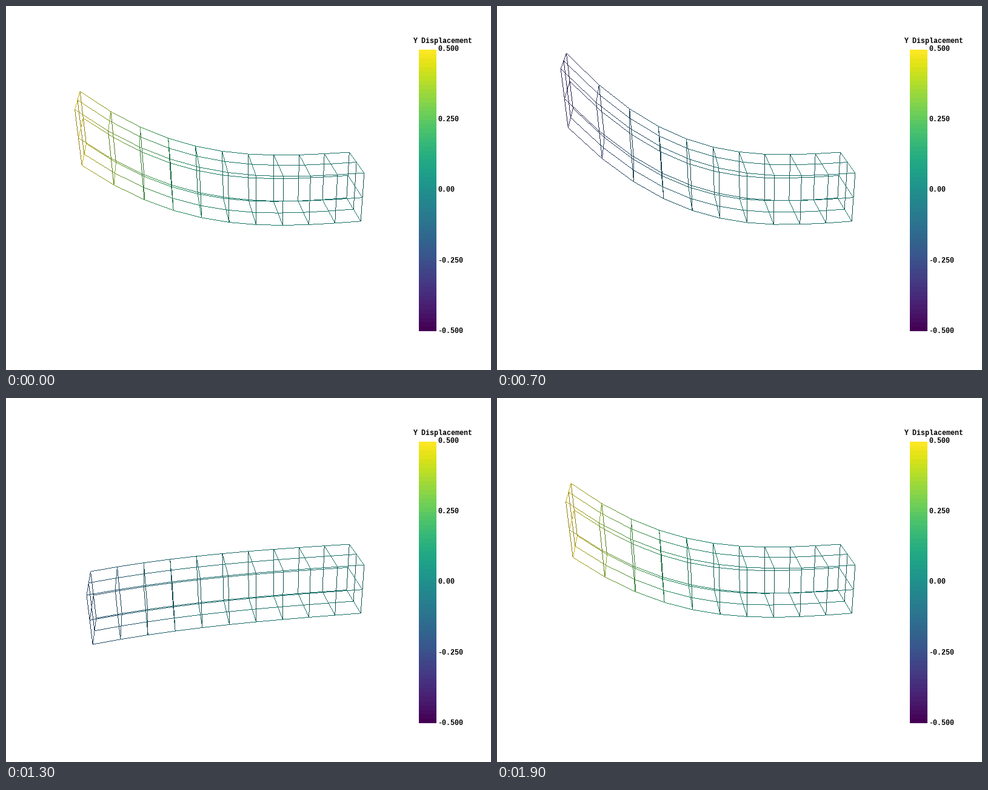
Recreate the animation shown at these times as a matplotlib script. Size 800 px wide and 600 px high, loop 2 s.

```python
import itertools

import numpy as np
import matplotlib.pyplot as plt
from matplotlib.animation import FuncAnimation

W, H, DPI = 800, 600, 100
FRAMES, INTERVAL = 20, 100
VIRIDIS = plt.get_cmap("viridis", 256)

# Camera: position, focal point, up vector, 30 degree view angle
EYE = np.array([11.915126, 6.113928, 3.612496])
FOCUS = np.array([0.0, 0.375, 2.0])
UP = np.array([-0.425464, 0.902424, -0.067898])
FOCAL = H / 2 / np.tan(np.radians(15))

back = (EYE - FOCUS) / np.linalg.norm(EYE - FOCUS)
right = np.cross(UP, back)
right /= np.linalg.norm(right)
VIEW = np.array([right, np.cross(back, right), back])


def light(elevation, azimuth, strength, rgb):
    e, a = np.radians([elevation, azimuth])
    aim = np.array([np.cos(e) * np.sin(a), np.sin(e), np.cos(e) * np.cos(a)])
    return aim, strength * np.array(rgb)


# Key, head and fill light, all fixed to the camera
LIGHTS = [
    light(50, 10, 0.75, (1.0, 0.972, 0.902)),
    light(0, 0, 0.25, (1.0, 1.0, 0.987)),
    light(-75, 0, 0.25, (0.933, 0.986, 1.0)),
]

# Beam of 2 x 2 x 10 cells, 1 x 1 x 5 units
SHAPE = (3, 3, 11)
NODES = np.stack(np.meshgrid(*(np.arange(n) * 0.5 for n in SHAPE),
                             indexing="ij"), axis=-1)
BEND = NODES[..., 2] ** 3 / 250


def surface_edges():
    edges = []
    for node in itertools.product(*map(range, SHAPE)):
        for axis in range(3):
            outer = any(node[b] in (0, SHAPE[b] - 1)
                        for b in range(3) if b != axis)
            if outer and node[axis] + 1 < SHAPE[axis]:
                end = list(node)
                end[axis] += 1
                edges.append((node, tuple(end)))
    return edges


EDGES = surface_edges()


def shade(p, q):
    """Light on a line, using its normal that best faces the viewer."""
    x, y, z = (q - p) / np.linalg.norm(q - p)
    normal = np.array([-x * z, -y * z, x * x + y * y])
    normal /= np.linalg.norm(normal)
    return sum(max(normal @ aim, 0) * rgb for aim, rgb in LIGHTS)


def stroke(canvas, a, b, va, vb, glow):
    """One pixel wide line with the scalar interpolated along it."""
    major = np.argmax(np.abs(b - a))
    if a[major] > b[major]:
        a, b, va, vb = b, a, vb, va
    steps = np.arange(np.ceil(a[major] - 0.5), np.ceil(b[major] - 0.5))
    t = (steps + 0.5 - a[major]) / (b[major] - a[major])
    cols, rows = np.floor(a + t[:, None] * (b - a)).astype(int).T
    rgb = VIRIDIS(va + t * (vb - va) + 0.5)[:, :3]
    canvas[rows, cols] = np.clip(rgb * glow, 0, 1)


def render(frame):
    waves = np.cos(2 * np.pi * np.arange(frame + 1) / (FRAMES - 1))
    points = NODES.copy()
    points[..., 1] += BEND * (2 + waves.sum())
    values = BEND * waves[-1]

    cam = (points - EYE) @ VIEW.T
    screen = FOCAL * cam[..., :2] / -cam[..., 2:]
    screen = screen * [1, -1] + [W / 2, H / 2]

    canvas = np.ones((H, W, 3))
    for m, n in sorted(EDGES, key=lambda e: cam[e[0]][2] + cam[e[1]][2]):
        stroke(canvas, screen[m], screen[n], values[m], values[n],
               shade(cam[m], cam[n]))
    return canvas


fig = plt.figure(figsize=(W / DPI, H / DPI), dpi=DPI, facecolor="white")
ax = fig.add_axes([0, 0, 1, 1])
ax.axis("off")
beam = ax.imshow(render(0), extent=(0, W, H, 0), aspect="auto",
                 interpolation="nearest")
ax.imshow(np.linspace(1, 0, 64)[:, None], cmap=VIRIDIS, aspect="auto",
          extent=(681, 710, 536, 72), interpolation="nearest")
ax.set_xlim(0, W)
ax.set_ylim(H, 0)


def label(x, y, text):
    ax.text(x, y, text, family="Liberation Mono", weight="bold",
            size=11.667 * 72 / DPI, color="black", va="baseline")


label(671, 61.5, "Y Displacement")
for i, text in enumerate(["0.500", "0.250", "0.00", "-0.250", "-0.500"]):
    label(712, 74 + 116.25 * i, text)


def update(frame):
    beam.set_data(render(frame))
    return [beam]


anim = FuncAnimation(fig, update, frames=FRAMES, interval=INTERVAL,
                     init_func=lambda: update(0), repeat=True, repeat_delay=0)
plt.show()
```
